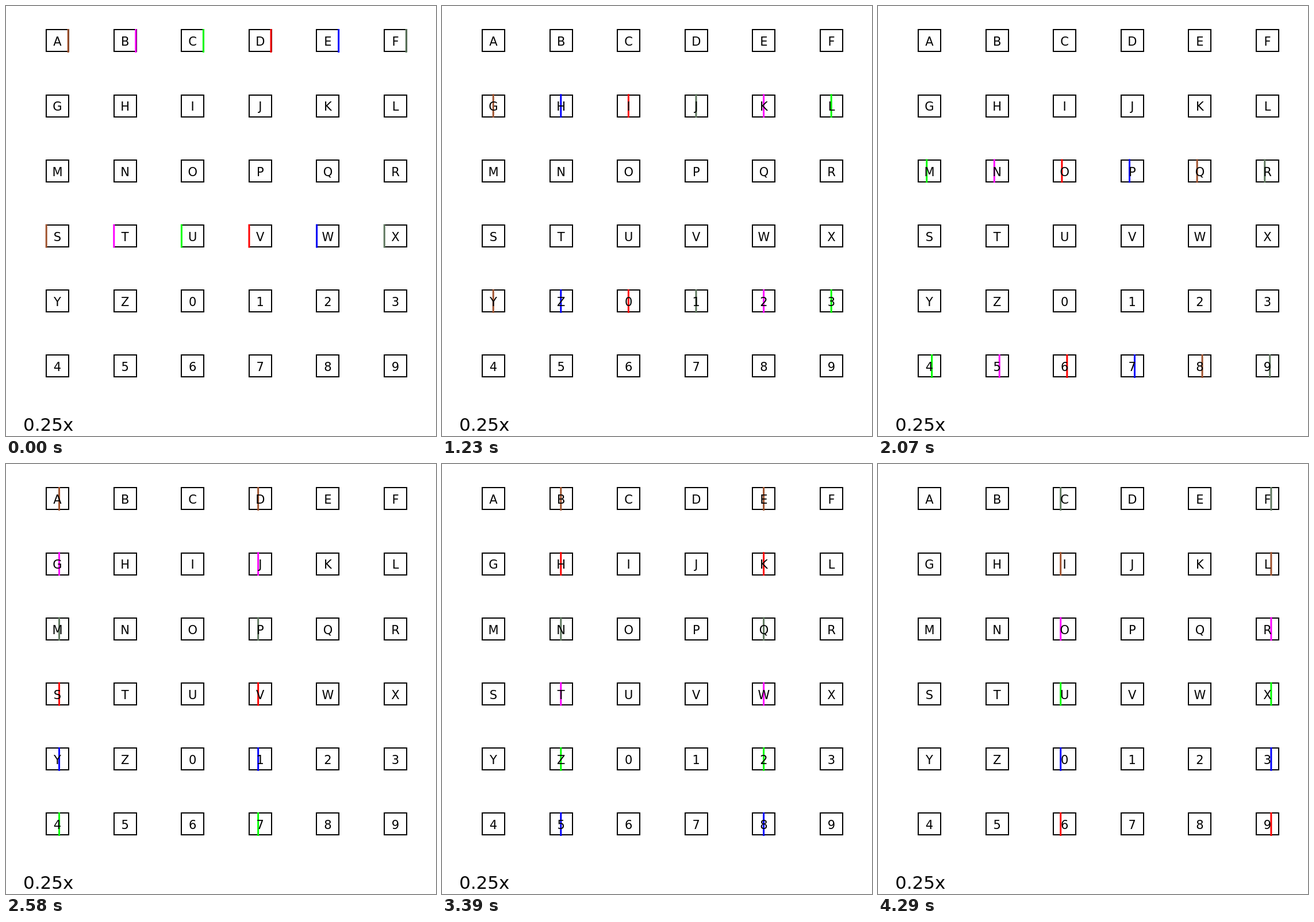
Write an HTML page with a canvas that moves like this. It is 748 by 748 pixels and loops after 4.32 s.

```html
<!DOCTYPE html>
<html>
<head>
<meta charset="utf-8">
<title>Moving bar speller</title>
<style>
html, body { margin: 0; width: 100%; height: 100%; overflow: hidden; background: #fff; }
canvas { display: block; }
</style>
</head>
<body>
<canvas id="stage" width="748" height="748"></canvas>
<script>
const ctx = document.getElementById('stage').getContext('2d');
const KEYS = 'ABCDEFGHIJKLMNOPQRSTUVWXYZ0123456789';
const STEP = 30, STEPS = 24, PHASES = 6;
const START = 19, SPEED = 19 / 17;
const COLORS = { n: '#a0522d', m: '#ff00ff', g: '#00ff00', r: '#ff0000', b: '#0000ff', s: '#5f785f' };
// Three row phases, then three column phases; one colour letter per cell.
const ORDERS = ['nmgrbs', 'nbrsmg', 'gmrbns', 'nmsrbg', 'nrsmgb', 'snmgbr'];

const cellX = col => 89.2 + 117.6 * col;
const cellY = row => 60.5 + 113.2 * row;

function eachCell(fn) {
  for (let i = 0; i < KEYS.length; i++) fn(i % 6, Math.floor(i / 6), KEYS[i]);
}

function drawBox(col, row) {
  const x = Math.round(cellX(col) - 19.2), y = Math.round(cellY(row) - 19.2);
  ctx.strokeRect(x, y, 39, 38);
}

function drawBar(x, y, color) {
  ctx.fillStyle = color;
  ctx.fillRect(x - 1.5, y - 20.5, 3, 41);
}

function drawBars(phase, step) {
  const offset = START - SPEED * step;
  const byRow = phase < 3, line = phase % 3;
  for (const [pos, dir] of [[line, 1], [line + 3, -1]]) {
    for (let i = 0; i < 6; i++) {
      const col = byRow ? i : pos, row = byRow ? pos : i;
      drawBar(cellX(col) + dir * offset, cellY(row), COLORS[ORDERS[phase][i]]);
    }
  }
}

function text(str, x, y, size, align) {
  ctx.font = size + 'px "DejaVu Sans", sans-serif';
  ctx.textAlign = align;
  ctx.fillStyle = '#000';
  ctx.fillText(str, x, y);
}

function draw(time) {
  const tick = Math.floor(time / STEP + 1e-6) % (STEPS * PHASES);
  ctx.fillStyle = '#fff';
  ctx.fillRect(0, 0, 748, 748);
  ctx.strokeStyle = '#000';
  ctx.lineWidth = 2;
  eachCell(drawBox);
  drawBars(Math.floor(tick / STEPS), tick % STEPS);
  eachCell((col, row, key) => text(key, cellX(col) + 0.3, cellY(row) + 8.7, 21, 'center'));
  text('0.25x', 30, 738.6, 31, 'left');
}

const begin = performance.now();
function loop() {
  draw(performance.now() - begin);
  requestAnimationFrame(loop);
}
loop();
</script>
</body>
</html>
```
